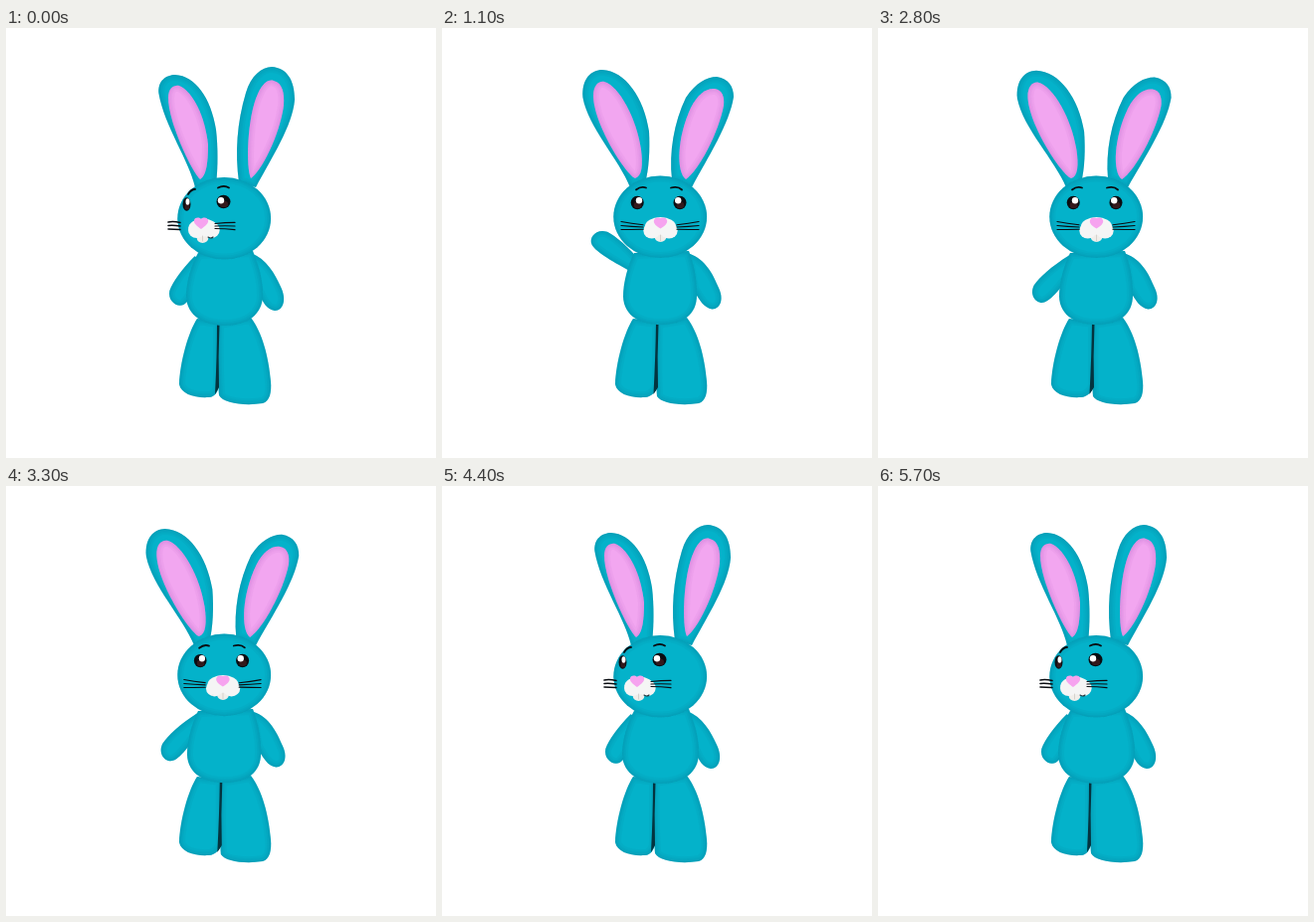
These frames come from a looping animation (432 by 432 pixels, 6300 ms). An HTML page with a canvas:

```html
<!DOCTYPE html>
<html lang="en">
<head>
<meta charset="utf-8">
<title>Waving bunny</title>
<style>
  html, body { margin: 0; height: 100%; overflow: hidden; background: #fff; }
  canvas { display: block; width: 432px; height: 432px; }
</style>
</head>
<body>
<canvas id="stage" width="432" height="432"></canvas>
<script>
const ctx = document.getElementById('stage').getContext('2d');
const TEAL = '#04b2ca', DEEP = '#007288', PINK = '#f2a6f0', INK = '#0a0d12';
const LOOP = 6300, STEP = 100, LAST = 57;

const lerp = (a, b, k) => a + (b - a) * k;
const ease = (a, b, x) => {
  const k = Math.min(1, Math.max(0, (x - a) / (b - a)));
  return k * k * (3 - 2 * k);
};

let turn = 0; // 0 = looking aside, 1 = facing the viewer

const mix = (side, front) => lerp(side, front, turn);

// Blend two paths of the same structure by the current turn
function blend(side, front) {
  const nums = front.match(/-?[\d.]+/g);
  let i = 0;
  return new Path2D(side.replace(/-?[\d.]+/g, n => mix(+n, +nums[i++])));
}

// Soft body part: flat colour, darker towards its rim
function plush(path, color = TEAL, rim = DEEP) {
  ctx.save();
  ctx.fillStyle = color;
  ctx.fill(path);
  ctx.clip(path);
  ctx.strokeStyle = rim;
  ctx.globalAlpha = 0.08;
  for (const w of [12, 8, 5, 2.5]) {
    ctx.lineWidth = w;
    ctx.stroke(path);
  }
  ctx.restore();
}

function oval(x, y, rx, ry, color) {
  ctx.fillStyle = color;
  ctx.beginPath();
  ctx.ellipse(x, y, rx, ry, 0, 0, 7);
  ctx.fill();
}

function line(path, width, color = INK) {
  ctx.strokeStyle = color;
  ctx.lineWidth = width;
  ctx.stroke(path);
}

function turned(x, y, angle, draw) {
  ctx.save();
  ctx.translate(x, y);
  ctx.rotate(angle);
  draw();
  ctx.restore();
}

function ear(x, angle, outer, inner) {
  turned(x, 155, angle, () => {
    ctx.translate(-x, -155);
    plush(outer);
    plush(inner, PINK, '#b45fc0');
  });
}

function ears(sway) {
  ear(197, -sway,
    blend('M190 160C184 133 159 98 153.5 66C152 53 161 47 170 47C190 48 206 70 211 102C213 120 213 140 211 157Z',
          'M189 160C178 132 147 100 141.5 70C140 51 150 42 161 42C184 43 203 70 208 104C209 122 208 142 204 156Z'),
    blend('M195 152C187 145 163 95 163 70C163 60 169 57 174 58C188 64 200 89 203 117C203 132 202 148 195 152Z',
          'M194 151C183 145 152 95 152 68C152 58 157 53 163 54C178 58 196 92 200 122C202 138 201 149 194 151Z'));
  ear(243, sway,
    blend('M234 155C230 125 232 95 241 65C246 48 257 39 267 39C282 40 290 52 290 72C288 98 267 130 251 160Z',
          'M231 152C228 125 233 95 245 70C255 55 266 49 276 49C288 51 293 59 293 69C289 96 267 130 251 160Z'),
    blend('M246 151C241 140 242 90 253 66C258 55 264 51 269 53C278 55 280 66 279 78C275 108 256 145 246 151Z',
          'M245 152C235 145 236 110 250 80C257 66 266 60 274 61C282 62 284 70 283 78C278 105 258 143 245 152Z'));
}

function legs() {
  plush(blend('M192 292C183 306 175 335 174 358C176 368 190 372 204 371C210 371 214 364 214 358L214 295Z',
              'M192 292C183 306 175 335 174 358C176 368 190 372 204 371C210 371 217 364 217 358L217 295Z'));
  plush(blend('M213 296C212 330 213 350 214 369C218 377 240 380 258 377C265 375 267 366 266 355C264 330 257 305 246 291Z',
              'M216 296C215 330 215 350 216 370C220 377 240 380 258 377C265 375 267 366 266 355C264 330 257 305 246 291Z'));
  ctx.fillStyle = '#04333e';
  ctx.fill(blend('M212 297L214.5 297Q213 330 214 361L210 368Q212 330 212 297Z',
                 'M215 297L217.5 297Q216 330 217 361L212.5 368Q214.5 330 215 297Z'));
}

function arms(lift) {
  const drop = mix(60, lerp(46, -38, lift)) * Math.PI / 180;
  turned(192, 237, -drop, () => {
    ctx.scale(-mix(0.93, 1), 1);
    plush(new Path2D('M-6 -6C14 -11 30 -12 40 -10.5C51 -7 52 5 45 9C37 13 16 10 -6 7Z'));
  });
  plush(blend('M246 226C262 232 270 247 276 260C282 272 279 284 270 284C262 283 258 276 252 262Z',
              'M246 226C262 230 271 244 277 259C284 272 280 282 271.5 282.5C263 281 259 274 252 262Z'));
}

function eye(x, y, rx, gx, gy, gr) {
  oval(x, y, rx, 6.7, INK);
  oval(x + 0.4, y + 2.4, rx * 0.6, 3.2, '#35191c');
  oval(gx, gy, gr, 3.2, '#fff');
}

function face() {
  ctx.lineCap = 'round';
  line(blend('M183 167Q186 162 190 162', 'M195 162.5Q200 158.5 205 160.5'), 1.8);
  line(blend('M213 160.5Q219 157.5 224 160.5', 'M230 160.5Q237 158.5 241 162.5'), 1.8);
  eye(mix(181.5, 196.2), mix(177, 175.5), mix(4, 6.5), mix(182.5, 198), mix(174.5, 173.2), mix(2, 3.2));
  eye(mix(218.5, 239), mix(174.5, 175.5), mix(7, 6.5), mix(216, 237.2), 173.2, 3.2);

  oval(mix(197.5, 219.5), mix(211, 210), 5.8, 5, '#f0eeea');
  oval(mix(198, 219.5), mix(200.5, 199), mix(14.5, 15.5), 9, '#f5f5f5');
  oval(mix(191.5, 210.8), mix(203, 203.5), 8.5, 8, '#f5f5f5');
  oval(mix(206, 228), mix(203, 203.5), 8.7, 8, '#f5f5f5');
  line(blend('M197.5 209V214', 'M219.5 208V214'), 0.6, '#c4bfbb');
  ctx.globalAlpha = 1 - turn;
  line(new Path2D('M203 210Q206 212 208 210'), 1.1, '#20333a');
  ctx.globalAlpha = 1;

  ctx.fillStyle = '#f6a3ef';
  ctx.fill(blend('M196 202C192 199 188 196 189 193C190 190 194 190 196 192C198 190 202 190 203 193C204 196 200 199 196 202Z',
                 'M219.5 201.5C215 199 212 196 213 193C214 190 217 190 219.5 191C222 190 225 190 226 193C227 196 224 199 219.5 201.5Z'));

  for (const d of [-1, 0, 1]) {
    line(blend(`M175 ${199 + 3.5 * d}Q168 ${198 + 4 * d} 163 ${198.5 + 3.5 * d}`,
               `M202 ${200 + 2.2 * d}Q190 ${199.5 + 3 * d} 180 ${198.5 + 4 * d}`), mix(1.5, 1.15));
    line(blend(`M210 ${199 + 2.5 * d}Q220 ${198.5 + 3 * d} 230 ${199 + 3.6 * d}`,
               `M236 ${200 + 2.2 * d}Q248 ${199.5 + 3 * d} 258 ${198.5 + 4 * d}`), 1.15);
  }
}

function draw(now) {
  const n = Math.min(LAST, Math.floor(now % LOOP / STEP));
  turn = ease(0, 3, n) - ease(32.6, 35.1, n);
  const lift = ease(0, 10, n) - ease(10, 22.7, n);
  const sway = 0.03 * (Math.min(1, n / 28) - 0.4) * turn;

  ctx.fillStyle = '#fff';
  ctx.fillRect(0, 0, 432, 432);
  legs();
  arms(lift);
  plush(blend('M193 226C186 238 181 255 181 270C182 290 200 299 220 299C242 299 258 288 258 268C258 250 253 238 248 224Z',
              'M193 226C187 238 182 255 182 270C183 290 200 298 220 298C242 298 256 288 256 268C256 250 253 238 248 224Z'));
  ears(sway);
  const head = new Path2D();
  head.ellipse(219.2, mix(191.3, 189.8), 46.9, 41.3, 0, 0, 7);
  plush(head);
  face();
}

const start = performance.now();
function loop() {
  draw(performance.now() - start);
  requestAnimationFrame(loop);
}
loop();
</script>
</body>
</html>
```
